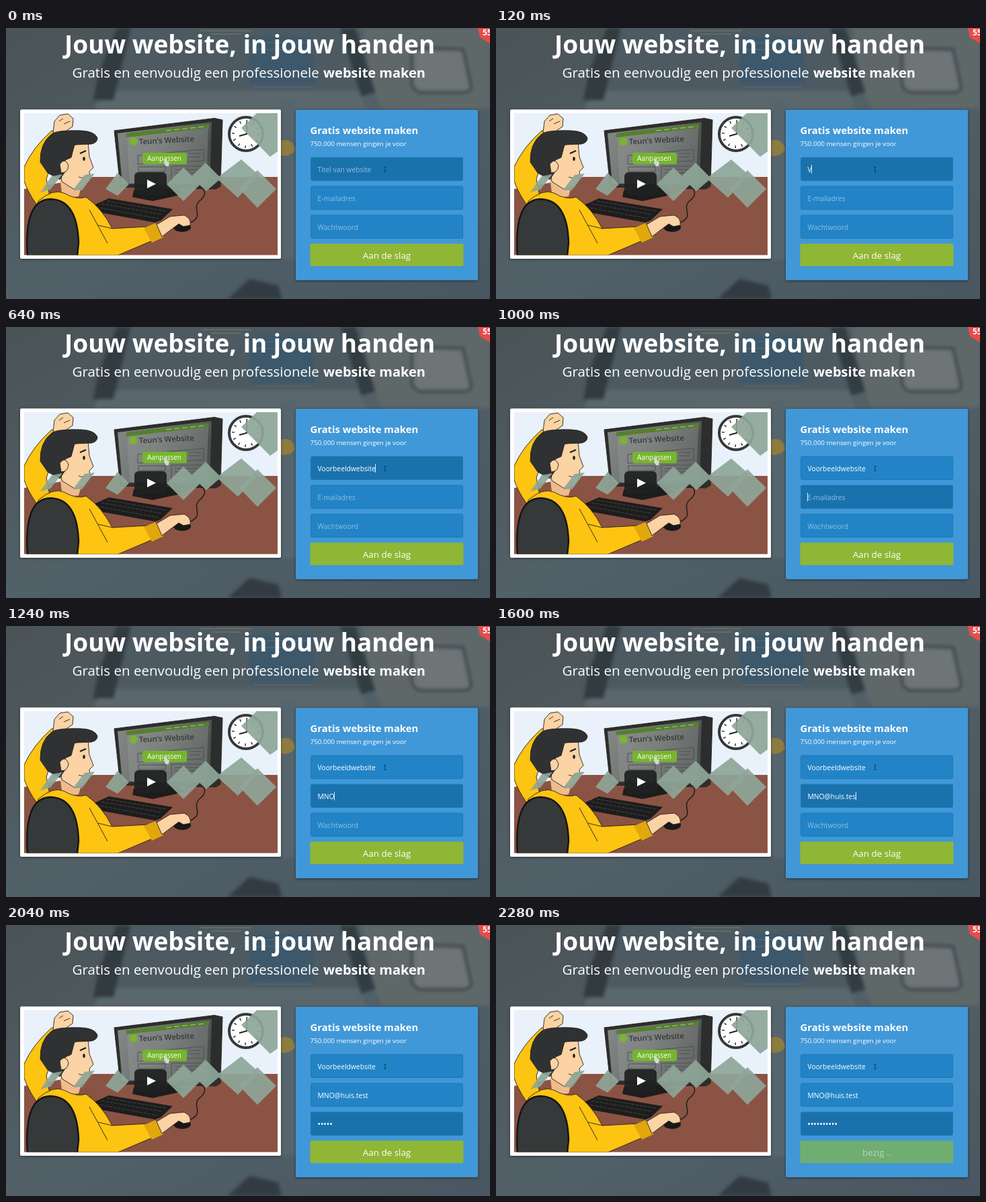
An HTML page that plays this animation: 720x404 px, repeating every 2.32 s.

```html
<!DOCTYPE html>
<html lang="nl">
<head>
<meta charset="utf-8">
<title>Gratis website maken</title>
<style>
html, body { margin: 0; width: 100%; height: 100%; overflow: hidden; background: #4b575e; }
svg { display: block; width: 720px; height: 404px; font-family: "Open Sans", "Noto Sans", sans-serif; }
text { fill: #fff; white-space: pre; }
.b { font-weight: 700; }
.field text { font-size: 10.3px; }
.field rect { stroke: #1d78b4; stroke-width: 1; }
.ink { stroke: #2a2118; stroke-width: .9; stroke-linejoin: round; }
</style>
</head>
<body>
<svg viewBox="0 0 720 404">
  <defs>
    <linearGradient id="bg" x2="1" y2="1">
      <stop offset="0" stop-color="#4a5355"/><stop offset=".5" stop-color="#526068"/><stop offset="1" stop-color="#485761"/>
    </linearGradient>
    <linearGradient id="screen" x2="1" y2=".3">
      <stop offset="0" stop-color="#858987"/><stop offset=".55" stop-color="#6d716f"/><stop offset="1" stop-color="#4b4f4d"/>
    </linearGradient>
    <filter id="blur"><feGaussianBlur stdDeviation="2.5"/></filter>
    <filter id="shade" x="-10%" y="-10%" width="120%" height="120%"><feDropShadow dx="0" dy="1" stdDeviation="2" flood-opacity=".45"/></filter>
    <clipPath id="pic"><rect x="27" y="127" width="377" height="211.500"/></clipPath>
  </defs>

  <!-- soft backdrop -->
  <rect width="720" height="404" fill="url(#bg)"/>
  <g filter="url(#blur)">
    <path d="M530 0H720V120H560L545 90Z" fill="#5f6869"/>
    <path d="M165 0H500L525 95H145Z" fill="#4d5a62"/>
    <path d="M362 12H455L460 84H362Z" fill="#3c596a"/>
    <path d="M145 94H525L535 122H130Z" fill="#5a676d"/>
    <path d="M165 0H186L160 108H130L137 70Z" fill="#303a40"/>
    <path d="M497 0H520L550 96L528 102Z" fill="#333d43"/>
    <path d="M604 38Q604 30 614 30L680 32L692 88Q690 96 680 96H616Q606 92 604 84Z" fill="#6d7577" stroke="#414b4f" stroke-width="5"/>
    <path d="M408 110H432V345H408Z" fill="#57656d"/>
    <path d="M330 404L362 374L405 384L410 404Z" fill="#303b43"/>
  </g>
  <g fill="none" stroke-width="1.500" opacity=".45">
    <path d="M290 4H365M305 9H350" stroke="#9b8b58"/>
    <path d="M368 22H452M368 32H430M368 88H455" stroke="#5f7987"/>
  </g>
  <path d="M409 168Q427 163 430 182Q423 193 409 190Z" fill="#8d7c40"/>
  <path d="M702 0H720V23L705 14Z" fill="#e84c4b"/>
  <text x="709" y="11" class="b" font-size="12">55</text>

  <text x="87" y="38" class="b" font-size="37">Jouw website, in jouw handen</text>
  <text x="98.500" y="74" font-size="20.550">Gratis en eenvoudig een professionele</text>
  <text x="472" y="74" class="b" font-size="20">website maken</text>

  <!-- video still -->
  <rect x="21" y="121.500" width="388" height="222.500" rx="2" fill="#fff" filter="url(#shade)"/>
  <g clip-path="url(#pic)">
    <rect x="27" y="127" width="377" height="212" fill="#e9f1fb"/>
    <path d="M27 240L130 222H404V339H27Z" fill="#8b5343"/>

    <circle cx="357" cy="158" r="25" fill="#fff" stroke="#35393b" stroke-width="4"/>
    <circle cx="357" cy="158" r="19" fill="none" stroke="#333" stroke-width="4" stroke-dasharray="1.500 8.448"/>
    <path d="M358 141V158L347 161" fill="none" stroke="#222" stroke-width="2"/>

    <!-- monitor -->
    <path d="M262 246C290 226 304 244 290 256C272 270 300 280 270 292" fill="none" stroke="#1d1d1d" stroke-width="1.500"/>
    <path d="M190 242L246 234L268 247L218 258L188 252Z" fill="#1d1d1d"/>
    <path d="M161 153L310 134.500L322 137L319 236L312 240L170 237Z" fill="#2c2e2d" class="ink"/>
    <path d="M166 157L306 140L303 234L173 232Z" fill="url(#screen)"/>
    <path d="M179 157L302 143V149L179 163Z" fill="#55802d"/>
    <path d="M238 153L296 147" stroke="#b4c2a3" stroke-dasharray="8 4"/>
    <path d="M180 163L301 149L298 232L184 231Z" fill="#999d9a" opacity=".35"/>
    <g fill="none" stroke="#4d5351">
      <path d="M196 190L294 181V198L196 203ZM197 207H237V214H197ZM246 206H292V229H246Z"/>
      <path d="M251 211H286M251 216H286M251 221H280M272 187H290M272 192H288"/>
    </g>
    <circle cx="189.500" cy="169" r="6" fill="#7cb331"/>
    <text x="198" y="173.500" font-size="11.500" font-weight="600" transform="rotate(-3 198 173)" style="fill:#35393a">Teun's Website</text>
    <rect x="203" y="186" width="66" height="17" rx="3" fill="#76b52e"/>
    <text x="210" y="198" font-size="10">Aanpassen</text>
    <path d="M236 196L238 195L240 199L243 200L242 206H238L235 201Z" fill="#d5d8d5"/>

    <!-- keyboard -->
    <path d="M124 267L153 254L248 270L230 287L222 290L128 273Z" fill="#1d1d1d"/>
    <g stroke="#444" stroke-width="1" stroke-dasharray="5 1.500"><path d="M150 258L238 273M142 262L232 278M134 267L226 284"/></g>

    <!-- man -->
    <path d="M27 207Q40 178 68 153L91 160L72 190L60 225L66 256L46 264Q32 244 27 228Z" fill="#fdc412" class="ink"/>
    <path d="M70 156L72 139L80 130L92 128L100 135L99 147L90 153L91 160Z" fill="#fbd3a4" class="ink"/>
    <path d="M79 139L85 135M86 143L95 139" fill="none" class="ink"/>
    <path d="M79 213L84 254L108 251L112 237Z" fill="#f0bb8c"/>
    <path d="M48 258Q70 239 86 246Q105 257 119 252Q143 269 158 299L212 296L234 310L166 339H40Z" fill="#fdc412" class="ink"/>
    <path d="M124 271L151 321M158 299L137 294" fill="none" class="ink"/>
    <path d="M205 298L222 291Q232 300 234 312L217 320Z" fill="#e0a80c"/>
    <ellipse cx="262" cy="297" rx="13" ry="7" fill="#181818"/>
    <path d="M224 293L244 281L265 279Q276 284 274 294L264 296L257 292L241 304L232 311Z" fill="#fbd3a4" class="ink"/>
    <path d="M77 180L122 170L124 192L130 208L124 214L125 225Q117 241 102 241L83 229Z" fill="#fbd3a4" class="ink"/>
    <path d="M51 200Q50 172 68 158Q76 152 112 153Q132 154 136 164Q136 171 127 173L102 174L97 193L88 197V214L80 226L62 216Z" fill="#2f3132" class="ink"/>
    <path d="M80 203Q88 192 93 205Q92 216 82 216Z" fill="#fbd3a4" class="ink"/>
    <path d="M110 187L119 183" stroke="#1b1a1a" stroke-width="2"/>
    <ellipse cx="116" cy="195" rx="1.700" ry="3" fill="#1b1a1a"/>
    <path d="M108 222Q116 226 123 219" fill="none" class="ink"/>
    <path d="M32 340Q26 256 66 255Q106 256 108 320L106 340Z" fill="#363939" stroke="#151515" stroke-width="2.500"/>

    <g fill="#8fa798" fill-opacity=".92">
      <path d="M51 245L68 221L84 218L66 241ZM100 241L117 219L132 217L113 242ZM148 240L166 216L183 233L166 250Z"/>
      <path d="M239 233L264 208L289 233L264 258ZM275 222L297 201L320 224L298 243ZM313 224L350 196L376 219L345 253Z"/>
      <path d="M347 240L374 212L402 240L374 268Z"/>
      <path d="M350 149L373 127H404V184L393 192Z"/>
    </g>
    <rect x="191" y="215" width="48" height="34" rx="6" fill="#202222" fill-opacity=".93"/>
    <path d="M210 226L223 232.500L210 239Z" fill="#fff"/>
  </g>

  <!-- form -->
  <rect x="431" y="122" width="271" height="254" rx="2" fill="#3f98d8" filter="url(#shade)"/>
  <text x="452.500" y="158" class="b" font-size="14.800">Gratis website maken</text>
  <text x="452.500" y="176" font-size="9.850">750.000 mensen gingen je voor</text>
  <g id="form"></g>
  <rect id="btn" x="452.500" y="321.500" width="228" height="33.500" rx="2"/>
  <text id="label" x="566.500" y="343.500" font-size="13.400" text-anchor="middle"></text>
  <path id="caret" stroke="#d7e9f5"/>
  <path d="M562.500 207.500H565.500M564 207.500V214.500M562.500 214.500H565.500" stroke="#123a57" fill="none"/>
</svg>
<script>
const LOOP = 2320, STEP = 40;
const $ = id => document.getElementById(id);

// focus: when the field becomes active; start and pace: typing clock in ms
const fields = [
  { hint: 'Titel van website', value: 'Voorbeeldwebsite', focus: 0, start: 80, pace: 35 },
  { hint: 'E-mailadres', value: 'MNO@huis.test', focus: 880, start: 1080, pace: 41 },
  { hint: 'Wachtwoord', value: '•'.repeat(10), focus: 1720, start: 1840, pace: 36, secret: true }
];

fields.forEach((f, i) => {
  f.y = 193 + i * 43;
  $('form').insertAdjacentHTML('beforeend',
    `<g class="field"><rect x="453.5" y="${f.y}" width="226" height="34.5" rx="2"/><text x="463.5" y="${f.y + 21.5}"></text></g>`);
  [f.box, f.text] = $('form').lastChild.children;
});

function drawField(f, active, t) {
  const count = Math.max(0, Math.floor((t - f.start) / f.pace));
  const typed = f.value.slice(0, count);
  f.box.style.fill = active ? '#1a72ad' : '#2284c6';
  f.text.textContent = typed || f.hint;
  f.text.style.fill = typed ? '#fff' : '#8dbfe2';
  f.text.style.fontSize = typed && f.secret ? '11.8px' : '';
  if (!active) return;
  const x = 464 + (typed ? f.text.getComputedTextLength() : 0);
  $('caret').setAttribute('d', `M${Math.round(x) - .5} ${f.y + 11}v13`);
  $('caret').style.display = f.secret || t < STEP ? 'none' : '';
}

function draw(now) {
  const t = Math.floor(now % LOOP / STEP) * STEP;
  const current = fields.filter(f => t >= f.focus).length - 1;
  fields.forEach((f, i) => drawField(f, i === current, t));
  const busy = t >= 2240;
  $('btn').style.fill = busy ? '#70ad70' : '#8fb735';
  $('label').textContent = busy ? 'bezig ' + '.'.repeat((t - 2200) / STEP) : 'Aan de slag';
  $('label').style.fill = busy ? '#b9d6ba' : '#fff';
}

const begin = performance.now();
function tick() {
  draw(performance.now() - begin);
  requestAnimationFrame(tick);
}
tick();
</script>
</body>
</html>
```
